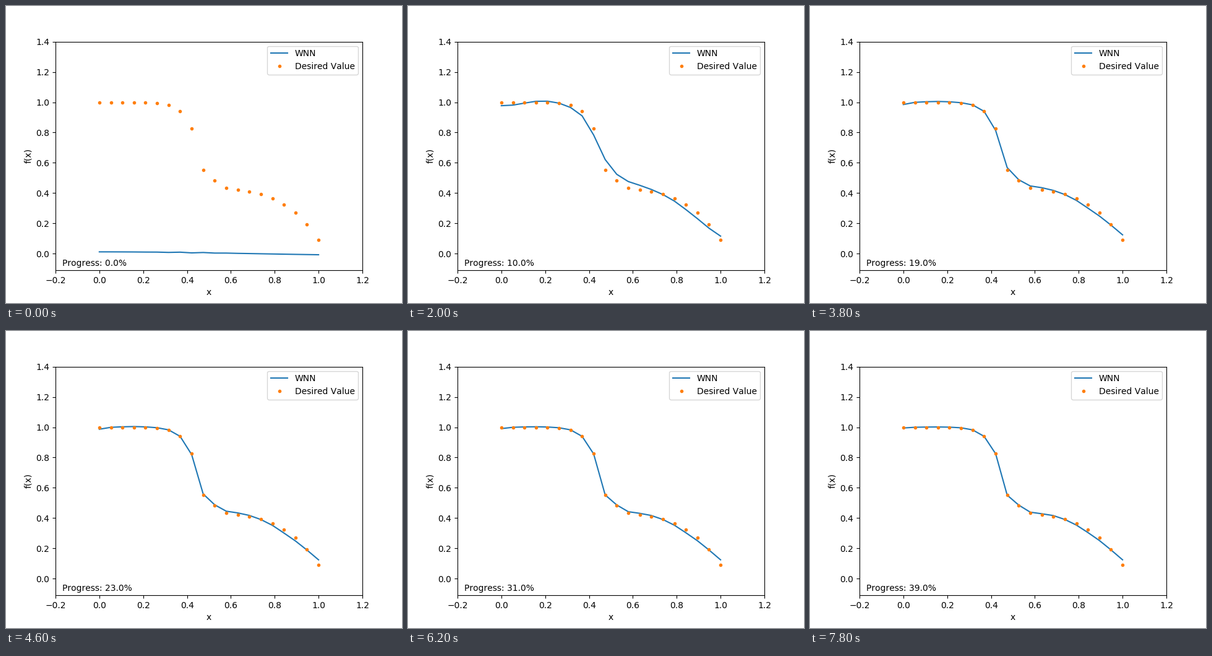
Write a matplotlib script that moves like this. It is 640 by 480 pixels and loops after 8000 ms.

```python
import numpy as np
import matplotlib.pyplot as plt
from matplotlib.animation import FuncAnimation

plt.rcParams["font.family"] = "DejaVu Sans"
plt.rcParams["text.kerning_factor"] = 6

FRAMES = 40
INTERVAL = 200
ROUGH = 6    # percent at which the smooth first fit is reached
SHARP = 14   # percent at which the step has been learned

x = np.linspace(0, 1, 20)


def bump(center, width):
    return np.exp(-((x - center) / width) ** 2)


# Desired function: a steep fall, then a small tail-off onto a second shoulder.
upper = 1 - (1.91 * x) ** 8
lower = 0.44 - 0.35 * x ** 6.5 + 0.051 * np.exp(-44 * (x - 0.526))
desired = np.where(x < 0.5, upper, lower)

# Untrained output: almost flat with a slight ripple.
untrained = 0.012 * np.cos(2.2 * x) - 0.002 * np.cos(19 * np.pi * x) * bump(0.42, 0.12)

# Smooth first fit: a polynomial through a few key points.
key_x = np.arange(0, 19, 3) / 18
key_y = [0.967, 1.010, 0.905, 0.633, 0.450, 0.285, 0.099]
rough = np.polyval(np.polyfit(key_x, key_y, 6), x)
trend = np.polyval(np.polyfit(x, rough, 1), x)

# Remaining error: center, width, lasting part, slowly fading part.
ERRORS = [
    (0.00, 0.035, 0.000, -0.018),
    (0.16, 0.080, 0.000, 0.006),
    (0.60, 0.060, 0.000, 0.016),
    (0.68, 0.050, 0.006, 0.000),
    (0.86, 0.085, -0.020, -0.007),
    (1.00, 0.035, 0.036, 0.000),
]


def refined(n):
    """Output once the step is learned, with errors shrinking over time."""
    t = max(n - SHARP, 0)
    fade = 1 - t / 35
    y = desired + sum((kept + fading * fade) * bump(c, w)
                      for c, w, kept, fading in ERRORS)
    step = 0.045 * bump(0.474, 0.025) - 0.031 * bump(0.421, 0.025)
    return y + step * np.exp(-0.19 * t)


def network(n):
    if n < ROUGH:
        # Rises quickly as a nearly straight line, then bends.
        shape = trend + (rough - trend) * (n / ROUGH) ** 1.2
        rise = (1 - np.exp(-1.1 * n)) / (1 - np.exp(-1.1 * ROUGH))
        return untrained + (shape - untrained) * rise
    blend = max(1 - (n - ROUGH) / (SHARP - ROUGH), 0) ** 1.6
    late = refined(n)
    return late + (rough - late) * blend


fig, ax = plt.subplots(figsize=(6.4, 4.8), dpi=100)
ax.set_xlim(-0.2, 1.2)
ax.set_ylim(-0.11, 1.4)
ax.set_xlabel("x")
ax.set_ylabel("f(x)")
line, = ax.plot(x, network(0), color="#1f77b4", label="WNN")
ax.plot(x, desired, ".", color="#ff7f0e", label="Desired Value")
label = ax.text(-0.17, -0.08, "")
ax.legend(loc="upper right")


def update(n):
    line.set_ydata(network(n))
    label.set_text(f"Progress: {n:.1f}%")
    return line, label


anim = FuncAnimation(fig, update, frames=FRAMES, interval=INTERVAL,
                     init_func=lambda: update(0), repeat=True, repeat_delay=0)
plt.show()
```
